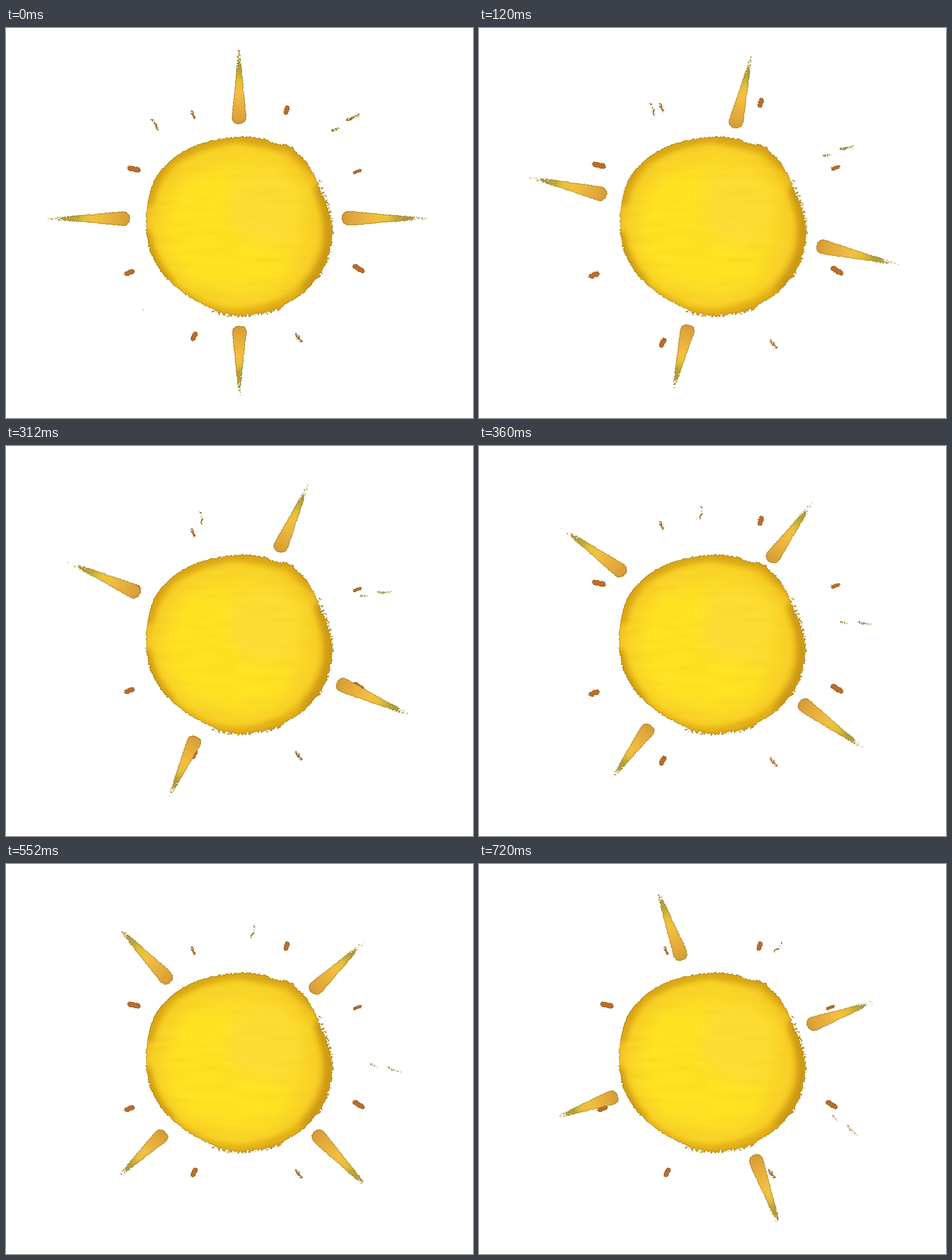
Write an HTML page without scripts that moves like this. It is 819 px wide and 684 px high and loops after 0.84 s.

```html
<!DOCTYPE html>
<html lang="en">
<head>
<meta charset="utf-8">
<title>Painted sun</title>
<style>
  html, body { margin: 0; width: 100%; height: 100%; overflow: hidden; background: #fff; }
  svg { display: block; width: 100vw; height: 100vh; }
  .rays, .left, .right, .dashes, .disc, .tip, .dust { animation: .84s step-end infinite; }
  .rays { animation-name: turn; transform-origin: 406px 339px; }
  .left { animation-name: nudge; }
  .right { animation-name: drift; }
  .dashes { animation-name: hop; transform-origin: 460px 359px; }
  .disc { animation-name: jitter; }
  .tip { animation-name: wear; }
  .dust { animation-name: thin; }

  @keyframes turn {
    0% { transform: none; }
    14.28% { transform: translate(.5px, 2px) rotate(13.2deg); }
    28.57% { transform: translate(-.5px, 1.5px) rotate(24deg); }
    42.85% { transform: translate(.5px, .5px) rotate(36deg); }
    57.14% { transform: translate(4px, 2px) rotate(46.3deg); }
    71.42% { transform: translate(8.5px, -.5px) rotate(57.3deg); }
    85.71%, 100% { transform: translate(8.5px, 1px) rotate(70deg); }
  }
  @keyframes nudge {
    0% { transform: none; }
    57.14%, 100% { transform: translateX(8px); }
  }
  @keyframes drift {
    0%, 57.14%, 100% { transform: none; }
    14.28% { transform: translate(7px, 2px); }
  }
  @keyframes hop {
    0%, 28.57%, 57.14%, 85.71%, 100% { transform: none; }
    14.28%, 42.85% { transform: scale(1.06); }
    71.42% { transform: translate(1.5px, -1px) scale(1.06); }
  }
  @keyframes jitter {
    0%, 28.57%, 85.71%, 100% { transform: none; }
    14.28% { transform: translateX(1.5px); }
    28.57%, 57.14% { transform: none; }
    71.42% { transform: translate(1.5px, -1px); }
  }
  @keyframes wear {
    0% { stop-opacity: .36; }
    14.28% { stop-opacity: .26; }
    28.57% { stop-opacity: .16; }
    42.85% { stop-opacity: .1; }
    57.14% { stop-opacity: .05; }
    71.42%, 100% { stop-opacity: 0; }
  }
  @keyframes thin {
    0% { opacity: .62; }
    14.28% { opacity: .57; }
    28.57% { opacity: .53; }
    57.14%, 100% { opacity: .5; }
  }
</style>
</head>
<body>
<svg viewBox="0 0 819 684" preserveAspectRatio="none">
  <defs>
    <!-- Soft alpha plus noise, cut hard: rough edges and dissolving tips -->
    <filter id="grain" filterUnits="userSpaceOnUse" x="40" y="10" width="740" height="664" color-interpolation-filters="sRGB">
      <feGaussianBlur in="SourceGraphic" stdDeviation="1.3" result="soft"/>
      <feTurbulence type="fractalNoise" baseFrequency=".38" numOctaves="2" seed="4" result="noise"/>
      <feComposite in="soft" in2="noise" operator="arithmetic" k2="14" k3="15" k4="-14.5" result="mask"/>
      <feComponentTransfer in="soft" result="paint"><feFuncA type="linear" slope="60"/></feComponentTransfer>
      <feComposite in="paint" in2="mask" operator="in" result="body"/>
      <feMorphology in="mask" operator="erode" radius="1" result="core"/>
      <feFlood flood-color="#7c5c16" flood-opacity=".45"/>
      <feComposite in2="mask" operator="in"/>
      <feComposite in2="core" operator="out" result="rim"/>
      <feMerge><feMergeNode in="body"/><feMergeNode in="rim"/></feMerge>
    </filter>
    <filter id="rough" filterUnits="userSpaceOnUse" x="225" y="165" width="375" height="365" color-interpolation-filters="sRGB">
      <feGaussianBlur in="SourceGraphic" stdDeviation="2" result="soft"/>
      <feTurbulence type="fractalNoise" baseFrequency=".24" numOctaves="3" seed="9" result="noise"/>
      <feComposite in="soft" in2="noise" operator="arithmetic" k2="16" k3="15" k4="-15.5" result="mask"/>
      <feComponentTransfer in="soft" result="paint"><feFuncA type="linear" slope="60"/></feComponentTransfer>
      <feComposite in="paint" in2="mask" operator="in" result="body"/>
      <feMorphology in="mask" operator="erode" radius="1" result="core"/>
      <feFlood flood-color="#8a6812" flood-opacity=".45"/>
      <feComposite in2="mask" operator="in"/>
      <feComposite in2="core" operator="out" result="rim"/>
      <feMerge><feMergeNode in="body"/><feMergeNode in="rim"/></feMerge>
    </filter>
    <filter id="streaks" x="0" y="0" width="1" height="1" color-interpolation-filters="sRGB">
      <feTurbulence type="fractalNoise" baseFrequency=".012 .09" numOctaves="3" seed="2"/>
      <feColorMatrix values="0 0 0 0 .85  0 0 0 0 .6  0 0 0 0 .06  0 0 0 .9 -.4"/>
    </filter>
    <filter id="blur" x="-.5" y="-.5" width="2" height="2"><feGaussianBlur stdDeviation="4"/></filter>
    <filter id="haze" x="-.5" y="-.5" width="2" height="2"><feGaussianBlur stdDeviation="14"/></filter>

    <linearGradient id="flame" gradientUnits="userSpaceOnUse" x1="0" y1="0" x2="0" y2="-138">
      <stop offset="0" stop-color="#d39a36"/>
      <stop offset=".15" stop-color="#e2a93b"/>
      <stop offset=".42" stop-color="#f3c041"/>
      <stop offset=".54" stop-color="#e6c03a"/>
      <stop offset=".68" stop-color="#b9a532" stop-opacity=".8"/>
      <stop class="tip" offset="1" stop-color="#c2a52c"/>
    </linearGradient>
    <radialGradient id="glow" gradientUnits="userSpaceOnUse" cx="405" cy="348" r="170">
      <stop offset="0" stop-color="#fde22d"/>
      <stop offset=".6" stop-color="#fcdd2a"/>
      <stop offset=".84" stop-color="#f9d128"/>
      <stop offset=".95" stop-color="#efbd22"/>
      <stop offset="1" stop-color="#dfaa1c"/>
    </radialGradient>

    <path id="ray" fill="url(#flame)" d="M-12-12C-13 3 12 3 13-10C14-25 9-52 8-72L3-138H-2L-6-72C-8-50-11-28-12-12Z"/>
    <path id="blob" d="M410 191C440 193 475 199 505 212C535 232 545 258 553 282C566 310 572 335 573 362C571 400 556 433 530 460C500 488 455 501 412 503C372 500 340 483 312 463C280 440 260 412 252 380C245 345 248 310 260 272C275 240 310 214 345 202Q378 193 410 191Z"/>
    <clipPath id="edge"><use href="#blob"/></clipPath>
  </defs>

  <g class="dashes">
    <g filter="url(#grain)" fill="none" stroke="#bd6c2b" stroke-width="9" stroke-linecap="round">
      <path d="M217 246L232 249M493 140L491 148M212 431L221 427M332 537L328 545M612 418L625 426"/>
      <path stroke-width="6" d="M611 253L621 250"/>
      <path stroke-width="7" opacity=".62" d="M326 147L330 157M509 538L517 549"/>
    </g>
  </g>

  <g class="disc">
    <g filter="url(#rough)" transform="translate(-3 0)">
      <g clip-path="url(#edge)">
        <use href="#blob" fill="url(#glow)"/>
        <g fill="none" filter="url(#blur)" stroke-linecap="round">
          <path stroke="#cf9c14" stroke-width="16" opacity=".75" d="M254 305Q262 262 290 235Q335 202 410 193L500 209L540 245"/>
          <path stroke="#c2910f" stroke-width="24" opacity=".75" d="M556 285Q580 340 569 390Q560 425 530 458"/>
          <path stroke="#c9950f" stroke-width="18" opacity=".8" d="M249 365Q258 412 290 445"/>
          <path stroke="#dca716" stroke-width="18" opacity=".75" d="M290 450Q350 502 412 502Q470 498 525 464"/>
        </g>
        <g filter="url(#haze)">
          <ellipse cx="370" cy="350" rx="85" ry="95" fill="#fee421"/>
          <ellipse cx="455" cy="315" rx="65" ry="65" fill="#fddd36"/>
          <ellipse cx="415" cy="415" rx="85" ry="38" fill="#fee421"/>
        </g>
        <rect x="240" y="185" width="340" height="325" filter="url(#streaks)" opacity=".3"/>
      </g>
      <g fill="none" stroke="#d7a21c" stroke-width="7" opacity=".5">
        <path d="M552 265Q578 320 575 372Q570 410 550 440M415 190L464 197M487 201L510 214M362 497Q430 518 492 488"/>
      </g>
    </g>
  </g>

  <g class="rays">
    <g filter="url(#grain)">
      <use href="#ray" transform="translate(408 169)"/>
      <g class="right"><use href="#ray" transform="translate(588 333) rotate(90) scale(1 1.1)"/></g>
      <use href="#ray" transform="translate(410 522) rotate(180) scale(1 .9)"/>
      <g class="left"><use href="#ray" transform="translate(218 335) rotate(-90) scale(1 1.06)"/></g>
      <g class="dust" fill="none" stroke="#a07c22" stroke-width="6">
        <path d="M255 157L268 180M570 182L586 174M596 163L621 152"/>
        <path stroke-width="3" d="M236 491L243 496"/>
      </g>
    </g>
  </g>
</svg>
</body>
</html>
```
